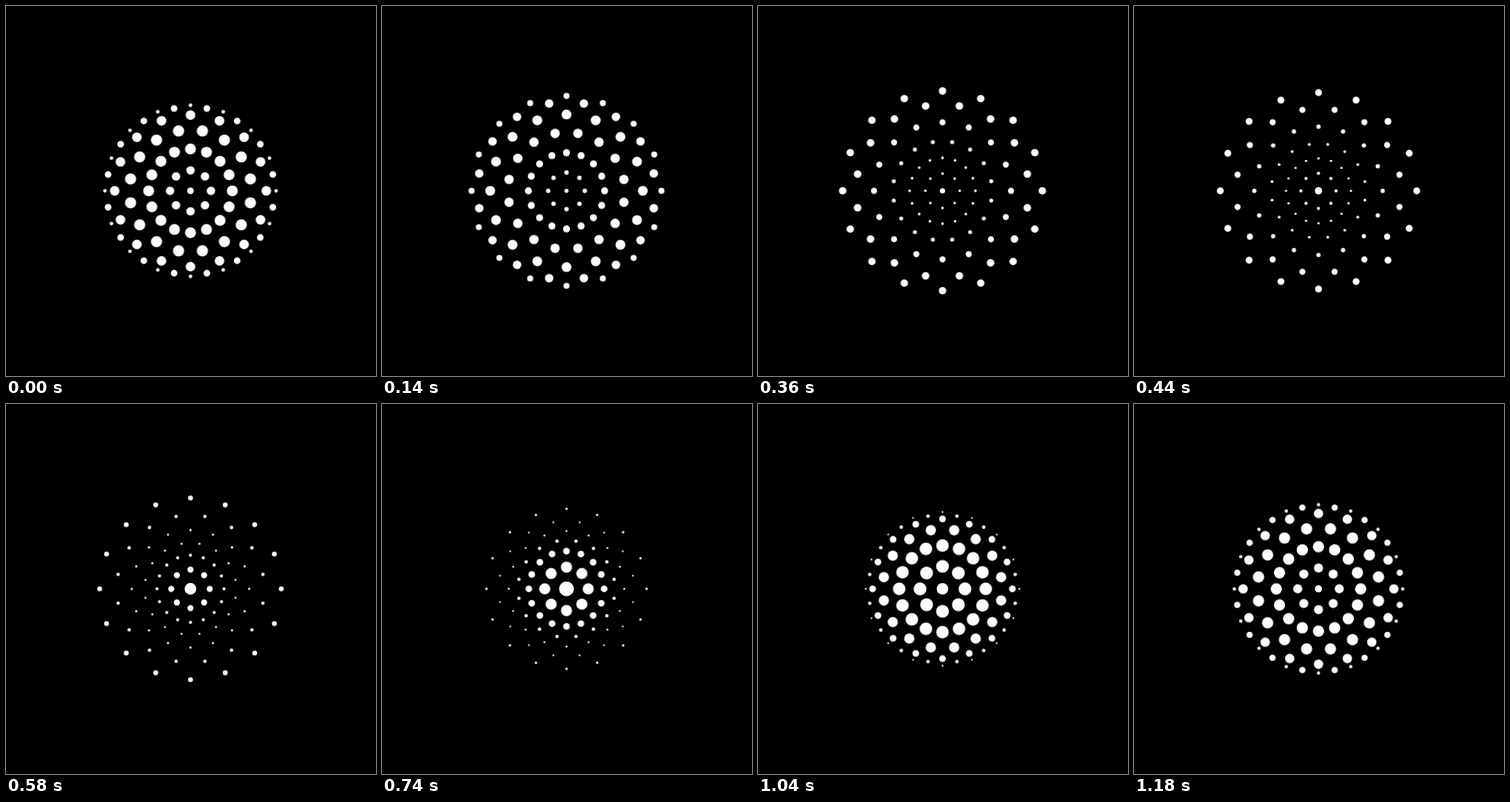
An HTML page that plays this animation: 500 by 500 pixels, repeating every 1200 ms.

```html
<!DOCTYPE html>
<html lang="en">
<head>
<meta charset="utf-8">
<title>Pulsing dots</title>
<style>
  html, body { margin: 0; height: 100%; overflow: hidden; background: #000; }
  svg { display: block; width: 100vw; height: 100vh; }
  circle { fill: #fefefe; }
</style>
</head>
<body>
<svg viewBox="0 0 500 500"><g id="dots" transform="translate(249.3 249.75)"></g></svg>
<script>
  const RINGS = 6;
  const HALF = 600;   // ms from largest to smallest
  const PEAK = 808;   // ms at which the centre dot is largest
  const LAG = 120;    // ms between neighbouring rings

  // Spacing and dot size both shrink steadily outwards
  const distance = k => k * (32.6 - 1.68 * k);
  const radius = k => 10.2 - 0.86 * k;
  const count = k => k ? Math.min(8 * k, 16) : 1;
  const turn = k => k > 1 && k % 2 ? 0.5 : 0;

  const root = document.getElementById('dots');

  function add(parent, name, attrs = {}) {
    const el = document.createElementNS('http://www.w3.org/2000/svg', name);
    for (const key in attrs) el.setAttribute(key, attrs[key]);
    return parent.appendChild(el);
  }

  function pulse(el, k, from, to) {
    const anim = el.animate([{ ...from, easing: 'ease-in-out' }, to], {
      duration: HALF,
      delay: PEAK + k * LAG - 4 * HALF,
      direction: 'alternate',
      iterations: Infinity,
    });
    anim.startTime = 0;
  }

  for (let k = 0; k <= RINGS; k++) {
    const ring = add(root, 'g');
    const dist = distance(k), size = radius(k), n = count(k);
    if (k) pulse(ring, k, { transform: 'scale(1)' }, { transform: 'scale(0.75)' });
    for (let i = 0; i < n; i++) {
      const a = (i + turn(k)) / n * 2 * Math.PI;
      const dot = add(ring, 'circle', { cx: dist * Math.cos(a), cy: dist * Math.sin(a), r: size });
      pulse(dot, k, { r: size + 'px' }, { r: size / 4 + 'px' });
    }
  }
</script>
</body>
</html>
```
